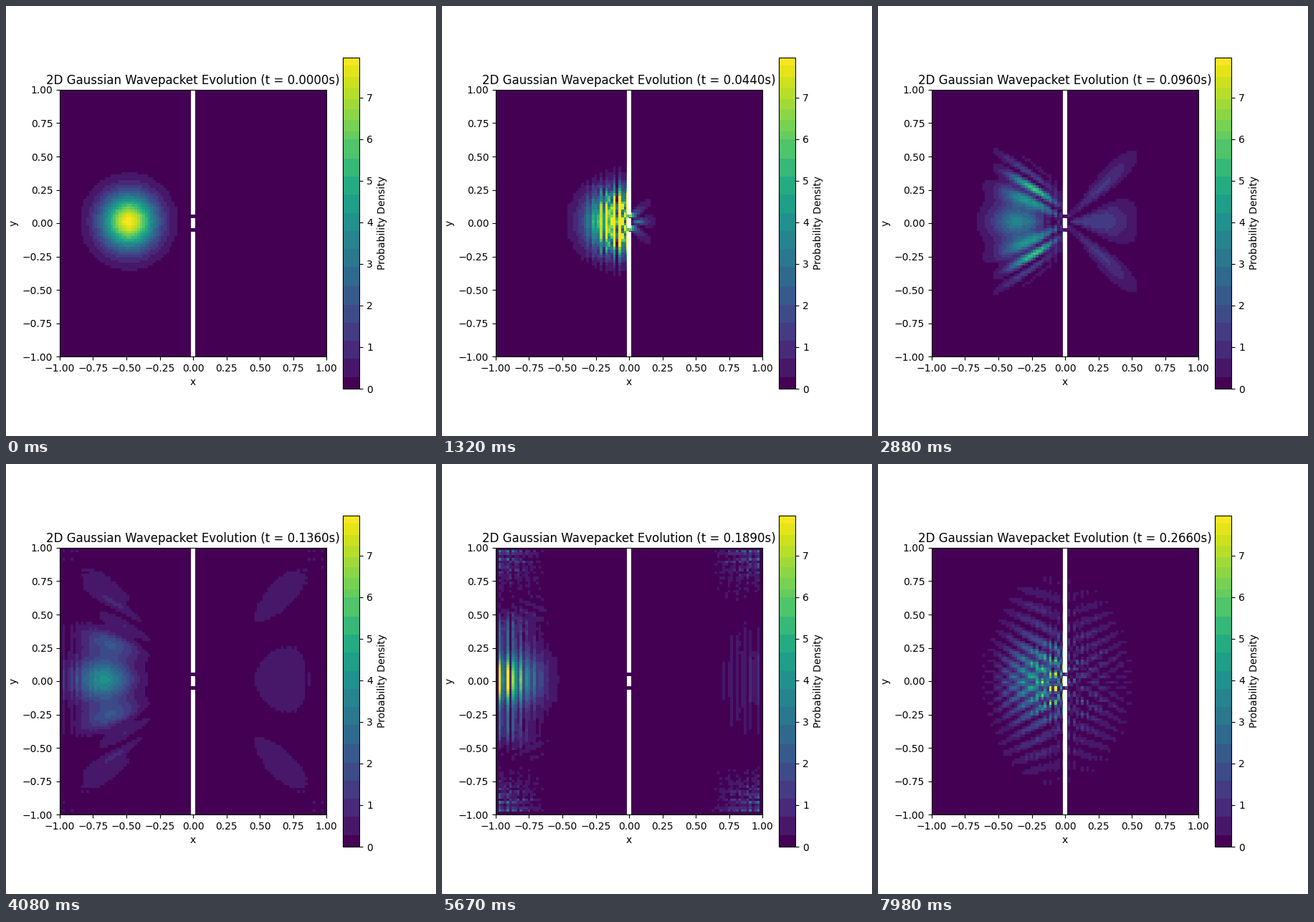
These frames come from a looping animation (600 by 600 pixels, 8000 ms). A matplotlib script:

```python
import numpy as np
import matplotlib.pyplot as plt
from matplotlib.animation import FuncAnimation
from matplotlib.colors import ListedColormap
from matplotlib.patches import Rectangle

FRAMES, LOOP_MS = 267, 8000
N, DX, DT = 100, 0.02, 0.001
RATE = 0.2                                  # hbar / mass
SIGMA, K0, START = 0.2, 30 * np.pi, -0.5
WALL, SLIT_IN, SLIT_OUT = 0.03, 0.035, 0.065

axis = -1 + DX * np.arange(N)
X, Y = np.meshgrid(axis, axis)

# cells where the wave may live: inside the box and not in the wall
free = np.ones((N, N))
free[[0, -1], :] = 0
free[:, [0, -1]] = 0
slit = (np.abs(Y) > SLIT_IN) & (np.abs(Y) < SLIT_OUT)
free[(np.abs(X) < WALL / 2) & ~slit] = 0


def half_step(psi):
    """Hamiltonian applied to psi, times DT / 2."""
    near = np.zeros_like(psi)
    near[1:-1, 1:-1] = (psi[2:, 1:-1] + psi[:-2, 1:-1]
                        + psi[1:-1, 2:] + psi[1:-1, :-2])
    return RATE * DT / (4 * DX**2) * free * (4 * psi - near)


def crank_nicolson(psi):
    rhs = psi - 1j * half_step(psi)
    new = psi
    for _ in range(22):
        new = (rhs - 1j * (half_step(new) - 0.5 * new)) / (1 + 0.5j)
    return new


def evolve():
    psi = np.exp(-((X - START)**2 + Y**2) / (2 * SIGMA**2) + 1j * K0 * X) * free
    psi /= np.sqrt(np.sum(np.abs(psi)**2)) * DX
    top = np.max(np.abs(psi)**2)
    density = []
    for _ in range(FRAMES):
        psi = crank_nicolson(psi)
        density.append(np.abs(psi)**2)
    return density, top


def banded_viridis(top):
    edges = np.concatenate([np.arange(0.27, 6, 0.44), np.arange(6.2, 7.9, 0.26)])
    values = (np.arange(256) + 0.5) / 256 * top
    band = np.digitize(values, edges)
    colors = plt.get_cmap("viridis")(np.arange(256))
    out = colors.copy()
    for b in np.unique(band):
        out[band == b] = colors[0] if b == 0 else colors[band == b].mean(axis=0)
    return ListedColormap(out)


density, top = evolve()

fig, ax = plt.subplots(figsize=(6, 6), dpi=100)
image = ax.imshow(density[0], extent=[-1, 1, -1, 1], origin="lower",
                  cmap=banded_viridis(top), vmin=0, vmax=top,
                  interpolation="nearest")
fig.colorbar(image, ax=ax, label="Probability Density")
ax.set_xlabel("x")
ax.set_ylabel("y")
title = ax.set_title("")

for low, high in [(-1, -SLIT_OUT), (-SLIT_IN, SLIT_IN), (SLIT_OUT, 1)]:
    ax.add_patch(Rectangle((-WALL / 2, low), WALL, high - low,
                           facecolor="white", edgecolor="none"))


def update(i):
    image.set_data(density[i])
    title.set_text(f"2D Gaussian Wavepacket Evolution (t = {i * DT:.4f}s)")
    return image, title


anim = FuncAnimation(fig, update, frames=FRAMES, interval=LOOP_MS / FRAMES,
                     init_func=lambda: update(0), repeat=True, repeat_delay=0)
plt.show()
```
